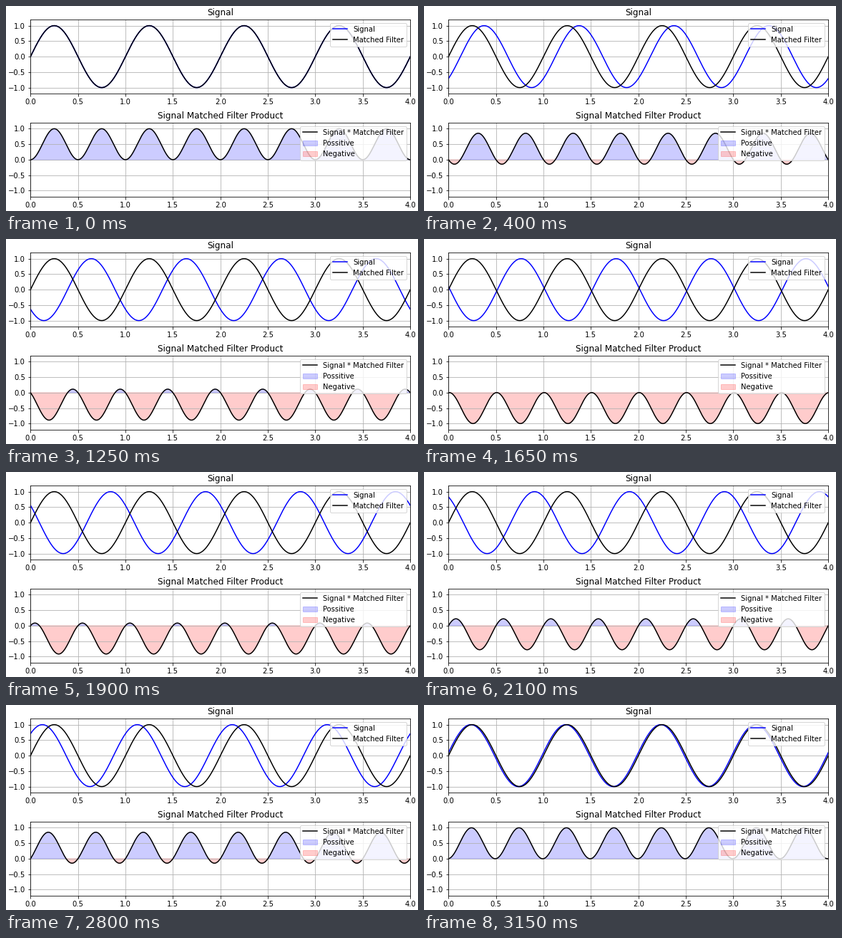
Write a matplotlib script that moves like this. It is 576 px wide and 288 px high and loops after 3.2 s.

```python
import numpy as np
import matplotlib.pyplot as plt
from matplotlib.animation import FuncAnimation

W, H, DPI = 576, 288, 72
FRAMES, INTERVAL = 64, 50
LEFT, RIGHT, AX_H = 34.25, 565.2, 104.4

plt.rcParams["font.family"] = "DejaVu Sans"
plt.rcParams["font.size"] = 10

t = np.linspace(0, 4, 1000)
matched = np.sin(2 * np.pi * t)

fig = plt.figure(figsize=(W / DPI, H / DPI), dpi=DPI)


def make_axes(top, title):
    ax = fig.add_axes([LEFT / W, 1 - (top + AX_H) / H, (RIGHT - LEFT) / W, AX_H / H])
    ax.set_title(title)
    ax.set_xlim(0, 4)
    ax.set_ylim(-1.2, 1.2)
    ax.set_xticks(np.arange(0, 4.5, 0.5))
    ax.set_yticks(np.arange(-1, 1.5, 0.5))
    ax.grid(True)
    return ax


def shade(product):
    """Fill the areas above and below zero."""
    return [
        ax_prod.fill_between(t, 0, product, where=product > 0,
                             color="b", alpha=0.2, label="Possitive"),
        ax_prod.fill_between(t, 0, product, where=product < 0,
                             color="r", alpha=0.2, label="Negative"),
    ]


ax_sig = make_axes(18.9, "Signal")
ax_prod = make_axes(163.68, "Signal Matched Filter Product")

signal_line, = ax_sig.plot(t, matched, "b", label="Signal")
ax_sig.plot(t, matched, "k", label="Matched Filter")
ax_sig.legend(loc="upper right")

product_line, = ax_prod.plot(t, matched ** 2, "k", label="Signal * Matched Filter")
fills = shade(matched ** 2)
ax_prod.legend(handles=[product_line, *fills], loc="upper right")


def update(i):
    # the signal slides right by one full period per loop
    signal = np.sin(2 * np.pi * (t - i / FRAMES))
    product = signal * matched
    signal_line.set_ydata(signal)
    product_line.set_ydata(product)
    for fill in fills:
        fill.remove()
    fills[:] = shade(product)
    return [signal_line, product_line, *fills]


anim = FuncAnimation(fig, update, frames=FRAMES, interval=INTERVAL,
                     init_func=lambda: update(0), repeat=True, repeat_delay=0)
plt.show()
```
